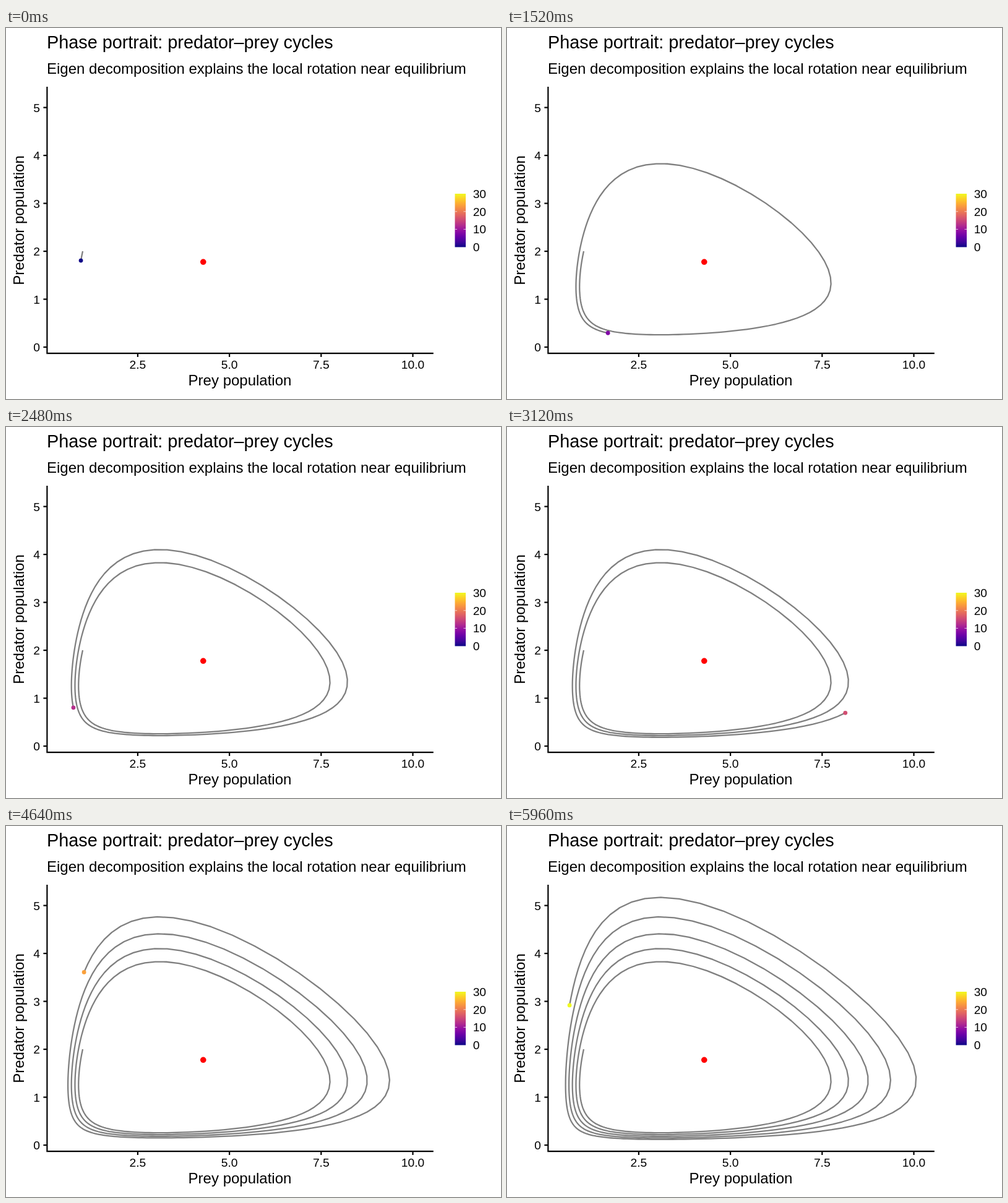
An HTML page that plays this animation: 800 px wide and 600 px high, repeating every 6000 ms.

```html
<!DOCTYPE html>
<html lang="en">
<head>
<meta charset="utf-8">
<title>Predator–prey phase portrait</title>
<style>
  html, body { margin: 0; width: 100%; height: 100%; overflow: hidden; background: #fff; }
  svg { display: block; width: 800px; height: 600px; font-family: "Liberation Sans", Arial, sans-serif; }
</style>
</head>
<body>
<svg id="stage" viewBox="0 0 800 600">
  <defs><linearGradient id="plasma" x1="0" y1="1" x2="0" y2="0"></linearGradient></defs>
  <text x="66" y="33" font-size="28.8">Phase portrait: predator–prey cycles</text>
  <text x="66" y="74" font-size="24">Eigen decomposition explains the local rotation near equilibrium</text>
  <text x="378" y="578" font-size="24" text-anchor="middle">Prey population</text>
  <text transform="translate(29.2 311) rotate(-90)" font-size="24" text-anchor="middle">Predator population</text>
  <g id="axes" font-size="19.2" stroke-width="2.2"></g>
  <rect x="725.5" y="268" width="17.5" height="86.4" fill="url(#plasma)"/>
  <g id="legend" font-size="19.2" stroke-width="0.7"></g>
  <path id="trail" fill="none" stroke="#7f7f7f" stroke-width="2.28" stroke-linejoin="round"/>
  <circle id="dot" r="3.4"/>
  <circle id="equilibrium" r="4.8" fill="#f00"/>
</svg>
<script>
const LOOP = 6000, FRAMES = 150, SPAN = 30, STEP = 0.05;
const GROWTH = 1, CAPACITY = 1000, ATTACK = 0.8, GAIN = 0.5, DEATH = 1.5;
const PLASMA = ["#0d0887", "#41049d", "#6a00a8", "#8f0da4", "#b12a90", "#cc4678",
                "#e16462", "#f1844b", "#fca636", "#fcce25", "#f0f921"];
const $ = id => document.getElementById(id);
const px = x => 64.7 + 59.28 * x;
const py = y => 516.1 - 77.5 * y;

function add(parent, tag, attrs, text = "") {
  const node = document.createElementNS("http://www.w3.org/2000/svg", tag);
  for (const name in attrs) node.setAttribute(name, attrs[name]);
  node.textContent = text;
  parent.append(node);
}
const line = (parent, d, stroke) => add(parent, "path", { d, stroke, fill: "none" });
const label = (parent, x, y, anchor, text) => add(parent, "text", { x, y, "text-anchor": anchor }, text);

function place(id, x, y) {
  $(id).setAttribute("cx", x);
  $(id).setAttribute("cy", y);
}

function drawAxes() {
  line($("axes"), "M66.4 95V526.1H690.8", "#000");
  for (const x of [2.5, 5, 7.5, 10]) {
    line($("axes"), `M${px(x)} 526v6`, "#000");
    label($("axes"), px(x), 551, "middle", x.toFixed(1));
  }
  for (let y = 0; y <= 5; y++) {
    line($("axes"), `M60.4 ${py(y)}h6`, "#000");
    label($("axes"), 55, py(y) + 6.9, "end", y);
  }
  PLASMA.forEach((color, i) => add($("plasma"), "stop", { offset: i / 10, "stop-color": color }));
  for (let v = 0; v <= 30; v += 10) {
    const y = 354.2 - v * 2.87;
    if (v % 30) line($("legend"), `M725.5 ${y}h3.5M739.5 ${y}h3.5`, "#fff");
    label($("legend"), 754.7, y + 6.9, "start", v);
  }
}

// Logistic prey growth with a slightly saturating predator response
function slope([x, y]) {
  const caught = x * y / (1 + 0.01 * x);
  return [GROWTH * x * (1 - x / CAPACITY) - ATTACK * caught, GAIN * caught - DEATH * y];
}

// The marked equilibrium assumes a stronger saturation than the trajectory
function markedEquilibrium() {
  const saturation = 0.1;
  const x = DEATH / (GAIN - DEATH * saturation);
  return [x, GROWTH / ATTACK * (1 - x / CAPACITY) * (1 + saturation * x)];
}

function trajectory() {
  const move = (p, k, h) => [p[0] + h * k[0], p[1] + h * k[1]];
  const points = [[1, 2]];
  for (let i = 0; i < SPAN / STEP; i++) {
    const p = points[i];
    const a = slope(p), b = slope(move(p, a, STEP / 2));
    const c = slope(move(p, b, STEP / 2)), d = slope(move(p, c, STEP));
    points.push(p.map((v, j) => v + STEP / 6 * (a[j] + 2 * b[j] + 2 * c[j] + d[j])));
  }
  return points;
}

function plasma(f) {
  const i = Math.min(9, Math.floor(f * 10)), t = f * 10 - i;
  const channel = (color, k) => parseInt(color.slice(1 + 2 * k, 3 + 2 * k), 16);
  const mix = k => Math.round(channel(PLASMA[i], k) * (1 - t) + channel(PLASMA[i + 1], k) * t);
  return `rgb(${mix(0)},${mix(1)},${mix(2)})`;
}

const toPixels = ([x, y]) => [px(x).toFixed(2), py(y).toFixed(2)];
const points = trajectory().map(toPixels);
const last = points.length - 1;

function render(ms) {
  const frame = Math.floor(ms % LOOP / (LOOP / FRAMES));
  const n = Math.min(last, Math.floor((frame + 0.5) * last / (FRAMES - 1)));
  $("trail").setAttribute("d", "M" + points.slice(0, n + 1).join("L"));
  place("dot", ...points[n]);
  $("dot").setAttribute("fill", plasma(n / last));
}

let start;
function tick(now) {
  start ??= now;
  render(now - start);
  requestAnimationFrame(tick);
}
drawAxes();
place("equilibrium", ...toPixels(markedEquilibrium()));
render(0);
requestAnimationFrame(tick);
</script>
</body>
</html>
```
